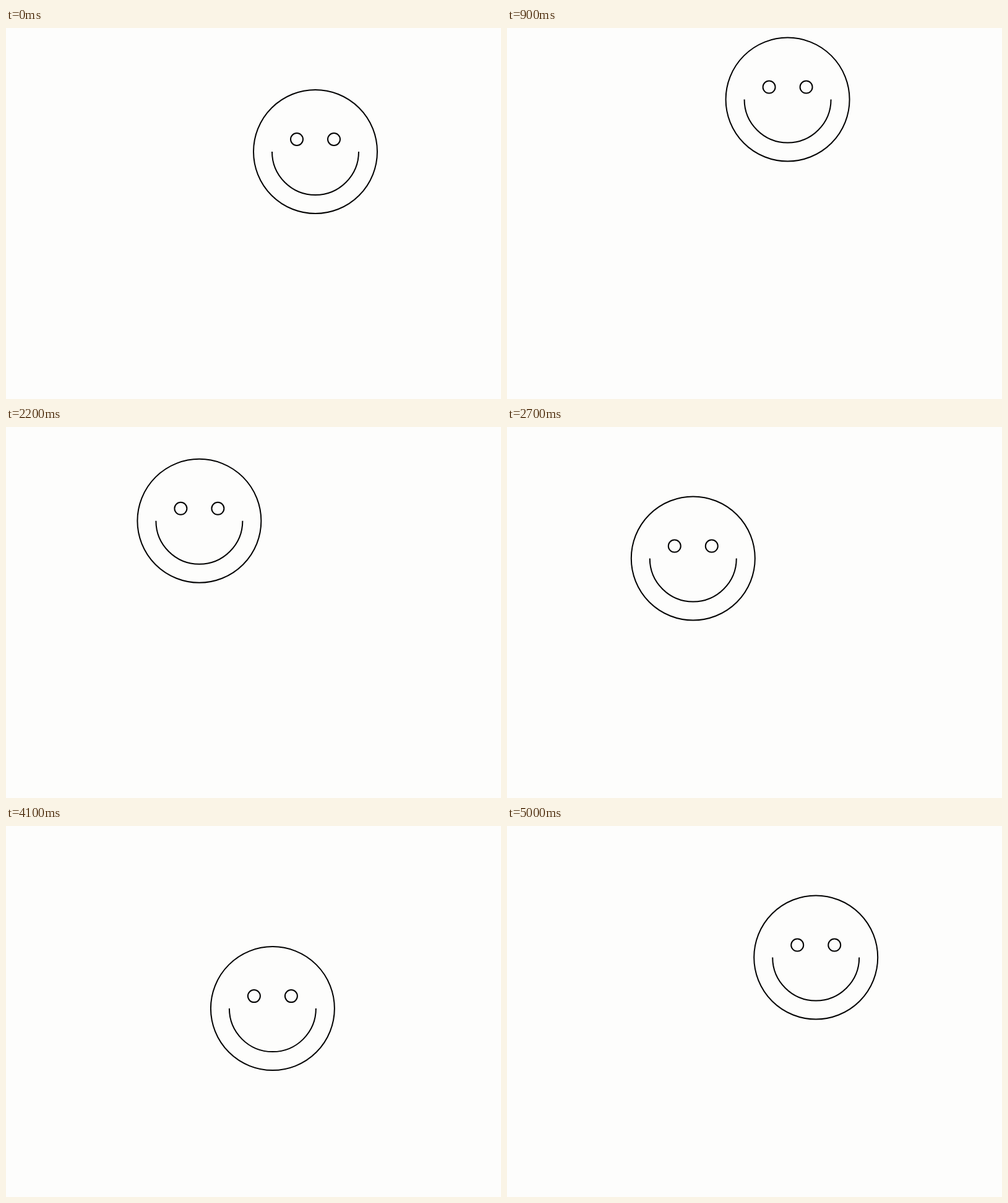
An HTML page with a canvas for the animation above (5.1 s loop, 800 px wide and 600 px high).

```html
<!DOCTYPE html>
<html lang="en">
<head>
<meta charset="utf-8">
<title>Orbiting smiley</title>
<style>
  html, body { margin: 0; width: 100%; height: 100%; overflow: hidden; background: #fdfdfc; }
  canvas { display: block; }
</style>
</head>
<body>
<canvas id="stage" width="800" height="600"></canvas>
<script>
  const ctx = document.getElementById('stage').getContext('2d');
  const LOOP = 5100, TICK = 100, STEPS = 50;

  function arc(x, y, radius, end = 2 * Math.PI) {
    ctx.beginPath();
    ctx.arc(x, y, radius, 0, end);
    ctx.stroke();
  }

  function drawSmiley(x, y) {
    arc(x, y, 100);
    arc(x - 30, y - 20, 10);
    arc(x + 30, y - 20, 10);
    arc(x, y, 70, Math.PI);
  }

  function draw(time) {
    // The starting pose is held for two ticks.
    const step = Math.max(0, Math.floor((time % LOOP) / TICK) - 1);
    const angle = step / STEPS * 2 * Math.PI;
    ctx.clearRect(0, 0, 800, 600);
    ctx.strokeStyle = '#000';
    ctx.lineWidth = 2;
    drawSmiley(400 + 100 * Math.cos(angle), 200 - 100 * Math.sin(angle));
  }

  const start = performance.now();
  function frame() {
    draw(performance.now() - start);
    requestAnimationFrame(frame);
  }
  frame();
</script>
</body>
</html>
```
